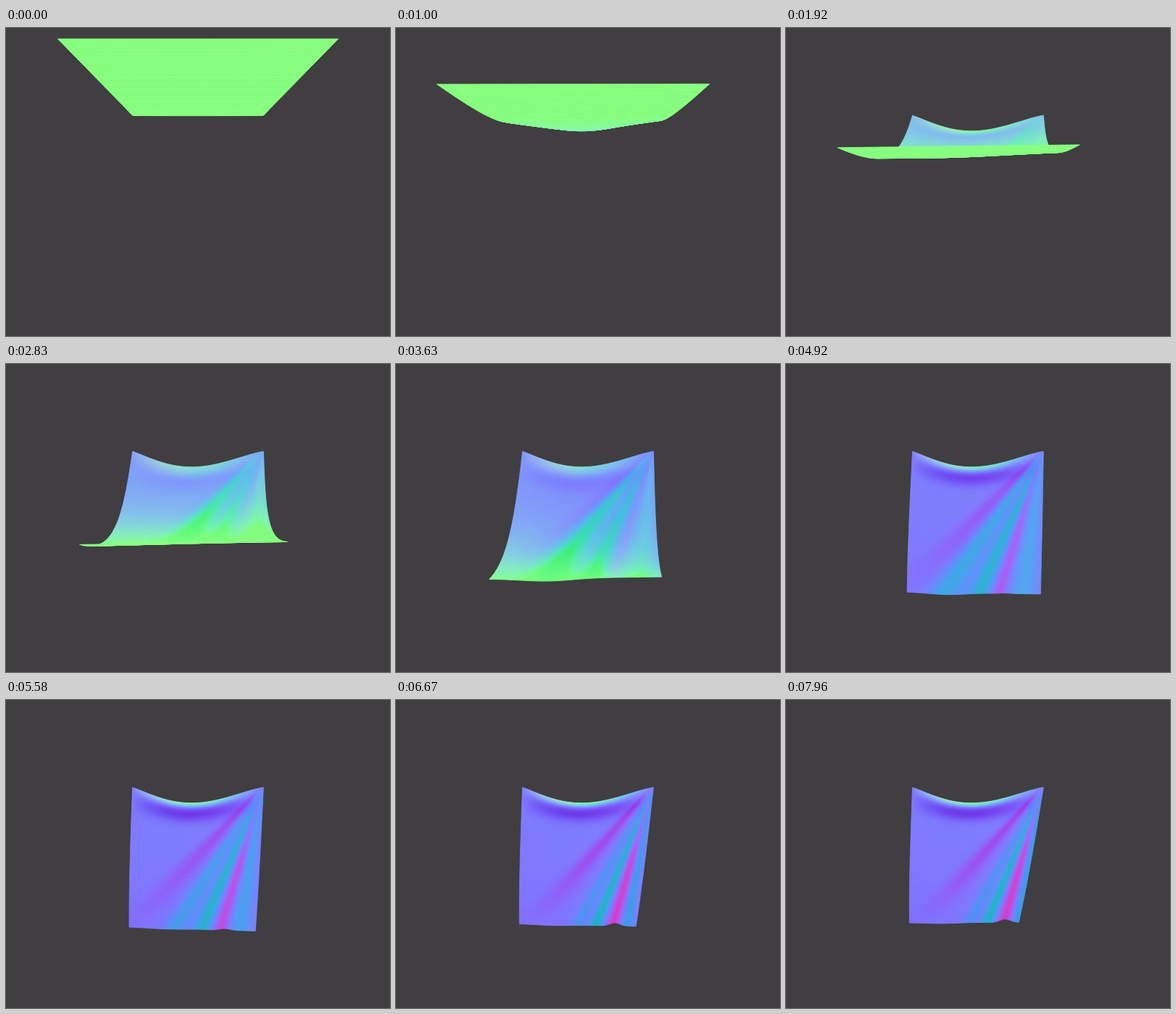
An HTML page with a canvas for the animation above (8000 ms loop, 533 by 427 pixels).

```html
<!DOCTYPE html>
<html lang="en">
<head>
<meta charset="utf-8">
<title>Falling cloth</title>
<style>
  html, body { margin: 0; width: 100%; height: 100%; overflow: hidden; background: #403e40; }
  canvas { display: block; width: 100%; height: 100%; }
</style>
</head>
<body>
<canvas id="stage" width="533" height="427"></canvas>
<script>
const LOOP = 8, COLS = 60, ROWS = 64;
const CX = 266.5, CY = 213.5, FOCAL = 341, DEPTH = 1.875;
const PIN_HEIGHT = 0.508, PIN_X = 0.5, RIGHT_PIN = { x: 358, y: 121 };

// Creases fanning out of the right pin. Each value runs from the falling to the hanging cloth:
// slope of the ray, its width, and how far the surface tilts in x and y.
const CREASES = [
  { slope: [1.1, 0.86], width: [0.2, 0.13], tiltX: [0, 0.42], tiltY: [-0.1, -0.6], fade: v => 1 - v ** 1.5 },
  { slope: [0.9, 0.54], width: [0.22, 0.05], tiltX: [-0.75, -0.4], tiltY: [0.65, 0.2], fade: () => 1 },
  { slope: [0.5, 0.41], width: [0.12, 0.05], tiltX: [-0.5, -0.8], tiltY: [0.4, 0.48], fade: () => 1 },
  { slope: [0.33, 0.29], width: [0.05, 0.045], tiltX: [0, 0.72], tiltY: [0, -0.52], fade: v => ramp(0.15, 0.6, v) },
  { slope: [0.08, 0.19], width: [0.2, 0.04], tiltX: [-0.1, -0.55], tiltY: [0.45, 0.25], fade: () => 1 }
];

const ctx = document.getElementById('stage').getContext('2d');
ctx.lineJoin = 'round';
ctx.lineWidth = 0.8;

const mix = (a, b, k) => a + (b - a) * k;
const bell = x => Math.exp(-x * x);
const ramp = (a, b, x) => {
  const k = Math.min(1, Math.max(0, (x - a) / (b - a)));
  return k * k * (3 - 2 * k);
};
const scaleAt = reach => FOCAL / (DEPTH - reach);

// The free corners speed up to a steady fall and stop softly when the cloth is taut
function fallen(t) {
  const way = (Math.hypot(t, 0.5) - 0.5) / 3;
  return way / (1 + way ** 7) ** (1 / 7);
}

// Side edge as a cubic curve in space (x, drop, reach towards the viewer)
function sideEdge(pinX, cornerX, cornerY, reach, fold, lead) {
  const drop = PIN_HEIGHT - (CY - cornerY) / scaleAt(reach);
  const points = [
    [pinX, 0, 0],
    [mix(pinX, cornerX, lead / 2), drop * (0.33 + 0.36 * fold), reach * 0.17],
    [mix(pinX, cornerX, lead), drop * (0.67 + 0.43 * fold), reach * 0.35],
    [cornerX, drop, reach]
  ];
  return v => {
    const w = 1 - v, weights = [w * w * w, 3 * w * w * v, 3 * w * v * v, v * v * v];
    return [0, 1, 2].map(c => points.reduce((sum, p, i) => sum + p[c] * weights[i], 0));
  };
}

function sideEdges(t) {
  const cornerY = 15 + 305 * fallen(t);
  const reach = 1 - Math.min(1, t / 4.7) ** 2.2;
  const fold = 1 - ramp(2.6, 4.7, t);
  const leftX = -PIN_X - 0.08 * ramp(0, 1.5, t) + 0.04 * ramp(3.6, 5.5, t);
  const rightX = PIN_X - 0.08 * ramp(0, 1.7, t) + 0.09 * ramp(2.5, 3.6, t) - 0.2 * ramp(3.8, 8.2, t);
  const leftY = cornerY - 11 * ramp(4.2, 7.5, t);
  const rightY = cornerY - 4 * ramp(0.8, 2, t) + 6 * bell((t - 5.2) / 1.2) - 8 * ramp(5.5, 8.2, t);
  return [
    sideEdge(-PIN_X, leftX, leftY, reach - 0.06 * ramp(4, 6, t), fold * 1.2, 0.8),
    sideEdge(PIN_X, rightX, rightY, reach * (1 - 0.6 * ramp(2.8, 3.6, t)), fold * 0.95, 0.6)
  ];
}

function buildRows(t) {
  const [left, right] = sideEdges(t);
  const sag = 0.119 * ramp(-0.1, 1, t);
  const roundness = mix(0.15, 1.25, ramp(0, 1.6, t));
  const bump = 4.5 * ramp(4.3, 7, t);
  const hem = 4 * ramp(3, 3.6, t) * (1 - 0.7 * ramp(4.4, 5.6, t));
  return Array.from({ length: ROWS + 1 }, (_, j) => {
    const v = j / ROWS, a = left(v), b = right(v);
    return Array.from({ length: COLS + 1 }, (_, i) => {
      const u = i / COLS;
      const [x, drop, reach] = a.map((value, c) => mix(value, b[c], u));
      const scale = scaleAt(reach);
      const slack = sag * (1 - v) ** 2 * Math.max(0, Math.sin(Math.PI * u ** 0.87)) ** roundness;
      const px = CX + x * scale;
      const py = CY - (PIN_HEIGHT - drop - slack) * scale
        - bump * v ** 12 * bell((px - 304) / 10)
        + hem * v ** 8 * bell((u - 0.3) / 0.2);
      return { px, py, drop, reach };
    });
  });
}

function creasesAt(t) {
  const progress = ramp(2.2, 7, t), strength = ramp(0.5, 3.6, t);
  return CREASES.map(({ slope, width, tiltX, tiltY, fade }) => ({
    slope: mix(...slope, progress),
    width: mix(...width, progress),
    tiltX: mix(...tiltX, progress) * strength,
    tiltY: mix(...tiltY, progress) * strength,
    fade
  }));
}

// The colour shows the direction of the surface: red = x, green = y, blue = z
function shade(u, v, a, c, d, creases, tension) {
  const down = Math.max(0, d.drop - a.drop), out = d.reach - a.reach;
  const length = Math.hypot(down, out) || 1, facing = down / length;
  let ny = out / length, nx = 0.06 * Math.max(0, ny);

  const x = (a.px + c.px) / 2, y = (a.py + c.py) / 2;
  const slope = (RIGHT_PIN.x - x) / Math.max(4, y - RIGHT_PIN.y + 4);
  for (const crease of creases) {
    const k = bell((slope - crease.slope) / crease.width) * crease.fade(v) * facing * v / (v + 0.06);
    nx += crease.tiltX * k;
    ny += crease.tiltY * k;
  }

  const arc = Math.sin(Math.PI * u ** 0.87) * facing;
  const lip = arc * bell(v / mix(0.08, 0.045, tension));
  const hollow = arc * bell((v - 0.1) / 0.07) * mix(0.15, 0.55, tension);
  nx += 0.5 * Math.max(0, 1 - 2 * u) * lip - 0.4 * (1 - u) * hollow;
  ny += mix(0.55, 1.05, tension) * lip - hollow;

  const flat = Math.max(1, Math.hypot(nx, ny));
  nx /= flat;
  ny /= flat;
  const nz = Math.sqrt(Math.max(0, 1 - nx * nx - ny * ny));
  return 'rgb(' + [nx, ny, nz].map(n => Math.round(128 + 127 * n)).join() + ')';
}

function draw(t) {
  ctx.fillStyle = '#403e40';
  ctx.fillRect(0, 0, 533, 427);
  const rows = buildRows(t), creases = creasesAt(t), tension = ramp(3, 5.6, t);
  // Far rows first, so that the nearer cloth covers them
  for (let j = 0; j < ROWS; j++) {
    for (let i = 0; i < COLS; i++) {
      const a = rows[j][i], b = rows[j][i + 1], c = rows[j + 1][i + 1], d = rows[j + 1][i];
      ctx.fillStyle = ctx.strokeStyle = shade((i + 0.5) / COLS, (j + 0.5) / ROWS, a, c, d, creases, tension);
      ctx.beginPath();
      for (const p of [a, b, c, d]) ctx.lineTo(p.px, p.py);
      ctx.closePath();
      ctx.fill();
      ctx.stroke();
    }
  }
}

const start = performance.now();
function tick() {
  draw((performance.now() - start) / 1000 % LOOP);
  requestAnimationFrame(tick);
}
tick();
</script>
</body>
</html>
```
